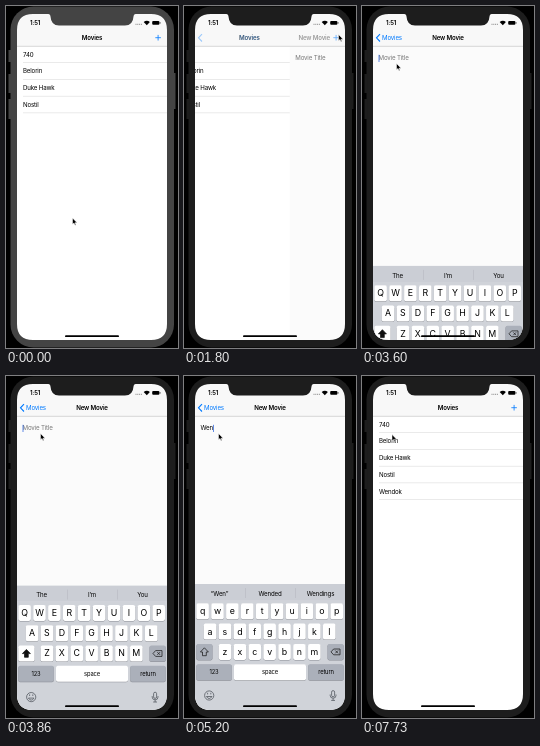
An HTML page for the animation above (8000 ms loop, 172 px wide and 342 px high).

```html
<!DOCTYPE html>
<html lang="en">
<head>
<meta charset="utf-8">
<title>Adding a movie</title>
<style>
html, body { margin: 0; height: 100%; overflow: hidden; background: #000; }
svg { display: block; width: 100vw; height: 100vh; }
text { font: 6.15px Inter, sans-serif; letter-spacing: -.16px; white-space: pre; }
.bold { font-weight: 600; }
.mid { text-anchor: middle; }
.key { font-size: 8.8px; letter-spacing: 0; }
.small { font-size: 5.8px; }
.blue { fill: #007aff; }
</style>
</head>
<body>
<svg viewBox="0 0 172 342">
  <defs>
    <clipPath id="screen"><path d="M27 8H42.5Q44.5 8 44.5 10.5Q45 19.5 53 19.5H119Q127 19.5 127.5 10.5Q127.5 8 129.5 8H145Q161 8 161 24V318Q161 334 145 334H27Q11 334 11 318V24Q11 8 27 8Z"/></clipPath>
  </defs>
  <g id="bezel">
    <rect x="4.5" y=".5" width="163.5" height="341" rx="23"/>
    <path d="M2.5 44h3v12h-3zM2.5 68h3v19h-3zM2.5 93h3v20h-3zM167 67h2.5v36h-2.5z"/>
  </g>
  <g clip-path="url(#screen)">
    <g id="list"></g>
    <g id="detail">
      <rect x="11" y="40" width="150" height="294" fill="#fbfbfb"/>
      <text id="hint" x="16.5" y="54.4" fill="#777">Movie Title</text>
      <text id="field" x="16.5" y="54.4"></text>
      <rect id="caret" y="48.8" width=".8" height="7.2" fill="#3b6fe0"/>
    </g>
    <rect x="11" y="8" width="150" height="32" fill="#f8f8f8"/>
    <rect x="11" y="39.9" width="150" height=".5" fill="#b0b0b0"/>
    <text class="bold mid" id="listTitle" x="86" y="33.9">Movies</text>
    <text class="bold mid" id="newTitle" x="86" y="33.9">New Movie</text>
    <path id="plus" d="M149.3 31.7h5.6M152.1 28.9v5.6" stroke="#007aff" stroke-width=".8"/>
    <g id="back">
      <path d="M18 28.1L14.5 31.8L18 35.5" fill="none" stroke="#007aff" stroke-width="1.1"/>
      <text id="backLabel" class="blue" x="20" y="33.9">Movies</text>
    </g>
    <text class="bold" x="24" y="19.1">1:51</text>
    <path d="M129.5 18.3h6.5" stroke="#777" stroke-width=".9" stroke-dasharray="1 .8"/>
    <path d="M140.8 19.2L137.7 16.1Q140.8 13.6 143.9 16.1Z"/>
    <rect x="146.2" y="15" width="7.2" height="3.8" rx="1"/>
    <rect x="153.8" y="16.2" width=".6" height="1.4"/>
    <g id="keyboard"></g>
    <rect x="59" y="329.2" width="54" height="1.9" rx=".95"/>
  </g>
  <path id="cursor" d="M0 0V6.3L1.5 5L2.5 7.3L3.5 6.9L2.5 4.7H4.6Z" stroke="#fff" stroke-width=".5"/>
</svg>
<script>
const $ = id => document.getElementById(id);
const LOOP = 8000, TITLE = 'Wendok', MOVIES = ['740', 'Belorin', 'Duke Hawk', 'Nostil', TITLE];
const KEY_TIMES = [4250, 4680, 5020, 5480, 5760, 6080];
const FOCUS = 1530, TAP = 3460, RETURN = 6570;
const SUGGESTIONS = [
  ['The', 'I’m', 'You'], ['“W”', 'We', 'What'], ['“We”', 'Well', 'Went'],
  ['“Wen”', 'Wended', 'Wendings'], ['“Wend”', '', ''], ['“Wendo”', '', ''], ['“Wendok”', '', '']
];
// time, x, y of the pointer's tip
const PATH = [
  [60, 66.5, 212], [560, 145, 62], [860, 165, 18], [1000, 165, 18], [1320, 154.5, 28.5],
  [1860, 154.5, 28.5], [2400, 121.5, 41.5], [2860, 121.5, 41.5], [3400, 34.5, 57.5],
  [7729, 34.5, 57.5], [7730, 30, 58.5]
];

const rect = (x, y, w, h, fill, r = 0) =>
  `<rect x="${x}" y="${y}" width="${w}" height="${h}" rx="${r}" fill="${fill}"/>`;
const label = (x, y, s, cls = '') => `<text x="${x}" y="${y}" class="${cls}">${s}</text>`;
const cap = (x, y, w, fill) => rect(x, y + .5, w, 16, '#898c93', 1.8) + rect(x, y, w, 16, fill, 1.8);

$('list').innerHTML = rect(11, 40, 150, 294, '#fff') + MOVIES.map((name, i) => {
  const y = 40 + 16.75 * i;
  return `<g>${label(17, y + 10.6, name)}${rect(17, y + 16.4, 144, .5, '#d4d4d4')}</g>`;
}).join('');

function buildKeyboard() {
  const grey = '#abb0ba', rowY = i => 227.3 + 20.3 * i;
  let s = rect(11, 224, 150, 120, '#d0d3d9');
  s += `<g id="bar">${rect(11, 208, 150, 16.2, '#cbced5')}`
    + [61, 111].map(x => rect(x, 212, .5, 10, '#b2b5bc')).join('')
    + [35.5, 86, 136.5].map(x => label(x, 219.8, '', 'mid word')).join('') + '</g>';
  ['qwertyuiop', 'asdfghjkl', 'zxcvbnm'].forEach((row, i) => {
    [...row].forEach((c, j) => {
      const x = [12.3, 19.75, 34.65][i] + 14.9 * j;
      s += cap(x, rowY(i), 12.6, '#fff') + label(x + 6.3, rowY(i) + 11, c, 'mid key letter');
    });
  });
  s += `<g id="shift">${cap(12.3, rowY(2), 16.2, grey)}</g>`
    + '<path id="arrow" d="M20.4 271.8L24.4 276H22.3V279.7H18.5V276H16.4Z" stroke="#111" stroke-width=".7"/>'
    + cap(143.5, rowY(2), 16.2, grey)
    + '<path d="M147 275.9L149.6 273H156V278.8H149.6ZM151.3 274.5l2.8 2.8m0-2.8l-2.8 2.8" fill="none" stroke="#111" stroke-width=".7"/>'
    + cap(12.3, rowY(3), 35.5, grey) + label(30, 298.4, '123', 'mid small')
    + cap(50, rowY(3), 72, '#fff') + label(86, 298.4, 'space', 'mid small')
    + cap(124.2, rowY(3), 35.5, grey) + label(142, 298.4, 'return', 'mid small')
    + '<g fill="none" stroke="#555a61" stroke-width=".8"><circle cx="25.2" cy="319.5" r="4.6"/>'
    + '<path d="M22.4 320.5Q25.2 324.6 28 320.5ZM23.6 316.8v1.6M26.8 316.8v1.6"/>'
    + '<rect x="147.6" y="314.6" width="3" height="6.2" rx="1.5"/>'
    + '<path d="M146.2 318.5v1q0 2.7 2.9 2.7t2.9-2.7v-1M149.1 322.2v2.2M147.2 324.4h3.8"/></g>';
  $('keyboard').innerHTML = s;
}
buildKeyboard();

const rows = [...$('list').querySelectorAll('g')];
const words = [...document.querySelectorAll('.word')];
const letters = [...document.querySelectorAll('.letter')];
const shiftCap = $('shift').lastElementChild;

const span = (t, a, b) => Math.min(1, Math.max(0, (t - a) / (b - a)));
const easeOut = u => 1 - (1 - u) ** 3;
const easeBoth = u => u * u * (3 - 2 * u);
const move = (el, x, y = 0) => el.setAttribute('transform', `translate(${x} ${y})`);
const show = (el, on) => el.setAttribute('opacity', +on);

function pointer(t) {
  const i = PATH.findIndex(p => p[0] > t);
  if (i === 0) return PATH[0].slice(1);
  if (i < 0) return PATH.at(-1).slice(1);
  const [a, b] = [PATH[i - 1], PATH[i]], u = easeBoth(span(t, a[0], b[0]));
  return [a[1] + (b[1] - a[1]) * u, a[2] + (b[2] - a[2]) * u];
}

function draw(t) {
  const popping = t >= RETURN;
  const p = popping ? 1 - easeOut(span(t, 6610, 7180)) : easeOut(span(t, 1730, 2230));
  const count = KEY_TIMES.filter(k => k <= t).length;

  $('bezel').setAttribute('fill', t < FOCUS ? '#444' : '#1d1d1d');
  move($('cursor'), ...pointer(t));

  move($('list'), -45 * p);
  move($('detail'), 150 * (1 - p));
  show(rows.at(-1), popping);
  move($('listTitle'), -56 * p);
  show($('listTitle'), 1 - p);
  move($('newTitle'), 70 * (1 - p));
  show($('newTitle'), p);
  show($('plus'), 1 - p);
  show($('back'), p);
  move($('backLabel'), 56 * (1 - p));

  $('field').textContent = TITLE.slice(0, count);
  show($('hint'), !count);
  const since = t - (count ? KEY_TIMES[count - 1] : TAP);
  show($('caret'), since >= 0 && !popping && since % 1000 < 600);
  $('caret').setAttribute('x', 16.6 + (count ? $('field').getComputedTextLength() : 0));

  const rise = easeOut(span(t, TAP, TAP + 520));
  move($('keyboard'), popping ? 150 * (1 - p) : 0, 134 * (1 - rise));
  show($('bar'), !popping);
  words.forEach((w, i) => w.textContent = SUGGESTIONS[count][i]);
  letters.forEach(l => {
    l.textContent = count ? l.textContent.toLowerCase() : l.textContent.toUpperCase();
  });
  shiftCap.setAttribute('fill', count ? '#abb0ba' : '#fff');
  $('arrow').setAttribute('fill', count ? 'none' : '#111');
}

const start = performance.now();
function tick() {
  draw((performance.now() - start) % LOOP);
  requestAnimationFrame(tick);
}
tick();
</script>
</body>
</html>
```
